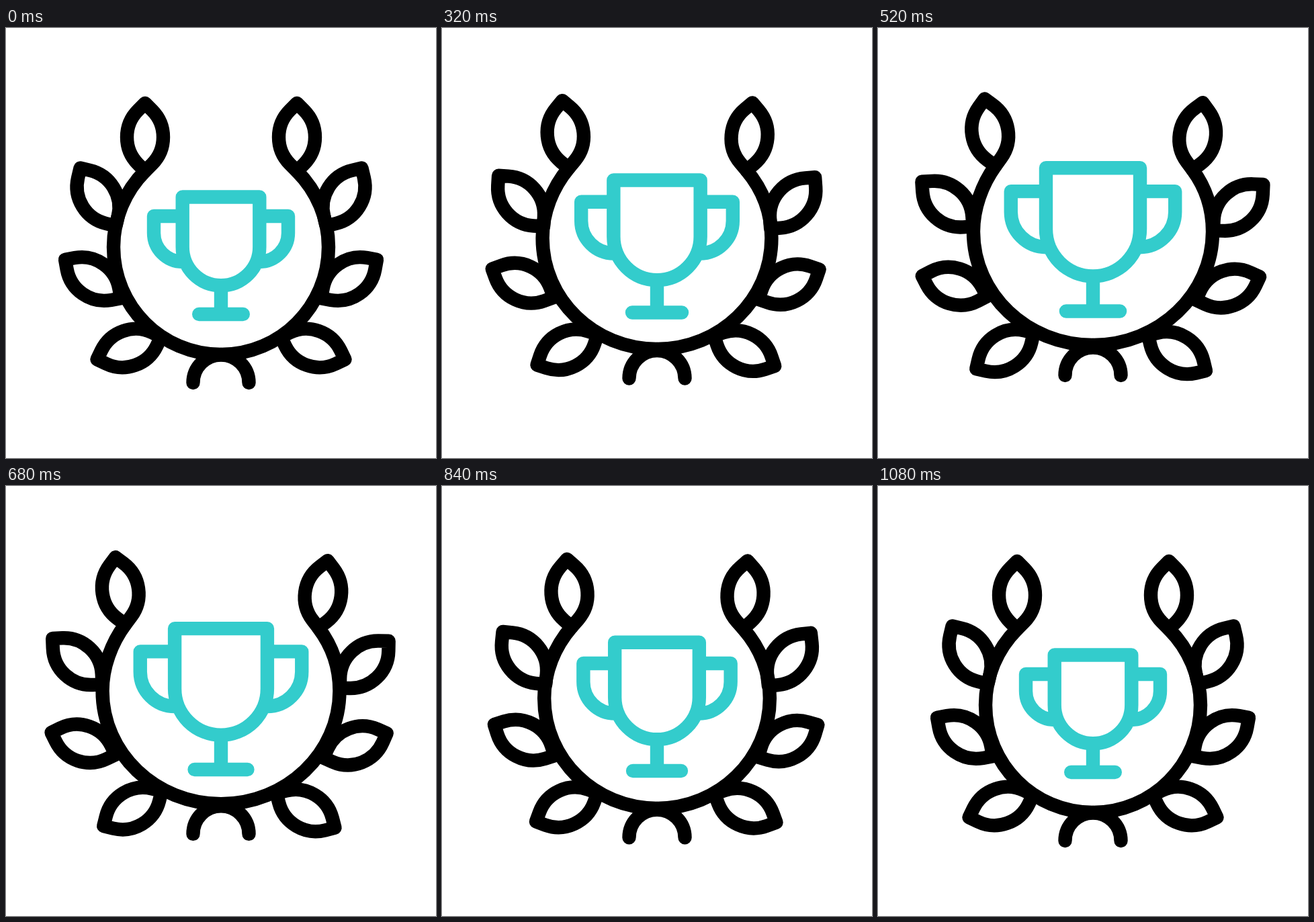
An HTML page with a canvas for the animation above (1.6 s loop, 640 by 640 pixels).

```html
<!DOCTYPE html>
<html lang="en">
<head>
<meta charset="utf-8">
<title>Trophy in a laurel wreath</title>
<style>
  html, body { margin: 0; width: 100%; height: 100%; overflow: hidden; background: #fff; }
  canvas { display: block; width: 640px; height: 640px; }
</style>
</head>
<body>
<canvas id="stage" width="640" height="640"></canvas>
<script>
const ctx = document.getElementById('stage').getContext('2d');
const LOOP = 1600, STEP = 40;
const CYAN = '#33cccc';

// Each leaf: centre x, y and angle (tip to base, degrees), closed and open.
const leaves = [
  [[207, 162.5, 90], [165.5, 155.2, 80.6]],
  [[137, 251.5, 58.4], [102.3, 262.4, 40.7]],
  [[129.5, 373.5, 34.8], [113.4, 384.6, 16.9]],
  [[183.2, 476.5, -19.4], [189.2, 480.6, -32.5]],
  [[433, 162.5, 90], [477, 161, 98.8]],
  [[503, 251.5, 121.6], [537.2, 267.6, 138]],
  [[510.5, 373.5, 145.2], [520.9, 388, 160.5]],
  [[456.8, 476.5, 199.4], [444.6, 483.8, 212]]
];

const LEAF_H = 50.5, LEAF_W = 27, LEAF_R = 56.7;

const mix = (a, b, p) => a + (b - a) * p;
const rad = deg => deg * Math.PI / 180;

// Timing curve with end handles (x1, 0) and (x2, 1).
function ease(x, x1, x2) {
  if (x <= 0) return 0;
  if (x >= 1) return 1;
  let lo = 0, hi = 1;
  for (let i = 0; i < 30; i++) {
    const t = (lo + hi) / 2, u = 1 - t;
    if (3 * x1 * t * u * u + 3 * x2 * t * t * u + t * t * t < x) lo = t;
    else hi = t;
  }
  return lo * lo * (3 - 2 * lo);
}

function openness(t) {
  return t <= 600
    ? ease((t - 50) / 550, 0.4, 0.488)
    : 1 - ease((t - 600) / 480, 0.232, 0.62);
}

function drawLeaf([x, y, angle]) {
  ctx.save();
  ctx.translate(x, y);
  ctx.rotate(rad(angle - 90));
  ctx.beginPath();
  ctx.moveTo(0, -LEAF_H);
  ctx.arc(LEAF_R - LEAF_W, 0, LEAF_R, rad(225), rad(135), true);
  ctx.lineTo(0, LEAF_H);
  ctx.arc(LEAF_W - LEAF_R, 0, LEAF_R, rad(45), rad(-45), true);
  ctx.closePath();
  ctx.stroke();
  ctx.restore();
}

// One half of the ring, from the base of the top leaf down to the middle.
function drawBranch([x, y, angle], side, p) {
  const edge = 320 + side * mix(160, 178.6, p);
  const midY = mix(326, 302.2, p);
  const bottom = mix(486, 471.5, p);
  const a = rad(angle), out = rad(angle - side * 45);
  const bx = x + LEAF_H * Math.cos(a), by = y + LEAF_H * Math.sin(a);
  const h = mix(42.4, 34, p), k = 0.5523;
  ctx.beginPath();
  ctx.moveTo(bx, by);
  ctx.bezierCurveTo(bx + h * Math.cos(out), by + h * Math.sin(out), edge, midY - h, edge, midY);
  ctx.bezierCurveTo(edge, mix(midY, bottom, k), mix(320, edge, k), bottom, 320, bottom);
  ctx.stroke();
}

function drawFoot(p) {
  const y = mix(528, 516.6, p);
  ctx.beginPath();
  ctx.arc(320, y, 41.5, Math.PI, 0);
  ctx.stroke();
}

// The trophy grows from a point below its base; its line width stays the same.
function drawTrophy(p) {
  const s = 1 + 0.229 * p;
  ctx.save();
  ctx.translate(320, 446);
  ctx.scale(s, s);
  ctx.beginPath();
  ctx.moveTo(-57.3, -194.5);
  ctx.lineTo(57.3, -194.5);
  ctx.lineTo(57.3, -120);
  ctx.arc(0, -120, 57.3, 0, Math.PI);
  ctx.closePath();
  for (const side of [-1, 1]) {
    ctx.moveTo(side * 57.3, -166);
    ctx.lineTo(side * 100, -166);
    ctx.lineTo(side * 100, -141);
    ctx.bezierCurveTo(side * 100, -117.3, side * 80.7, -98, side * 57, -98);
    ctx.lineTo(side * 53, -98);
  }
  ctx.moveTo(0, -62.7);
  ctx.lineTo(0, -20);
  ctx.moveTo(-32.8, -20);
  ctx.lineTo(32.8, -20);
  ctx.restore();
  ctx.stroke();
}

function draw(t) {
  const p = openness(t);
  const pose = leaves.map(([a, b]) => a.map((v, i) => mix(v, b[i], p)));
  ctx.fillStyle = '#fff';
  ctx.fillRect(0, 0, 640, 640);
  ctx.lineWidth = 20.4;
  ctx.lineCap = ctx.lineJoin = 'round';
  ctx.strokeStyle = '#000';
  pose.forEach(drawLeaf);
  drawBranch(pose[0], -1, p);
  drawBranch(pose[4], 1, p);
  drawFoot(p);
  ctx.strokeStyle = CYAN;
  drawTrophy(p);
}

const start = performance.now();
function tick() {
  const t = (performance.now() - start) % LOOP;
  draw(Math.floor(t / STEP) * STEP);
  requestAnimationFrame(tick);
}
tick();
</script>
</body>
</html>
```
